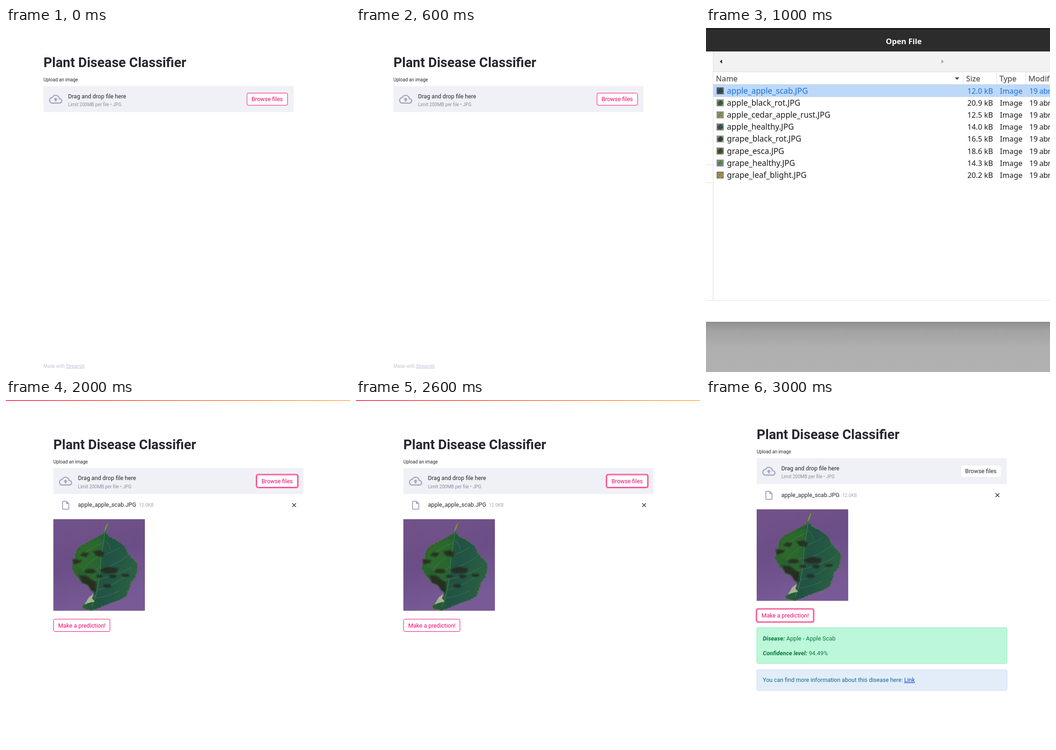
Animation of 748 by 748 pixels, one loop 4000 ms. Source, as an HTML page:

```html
<!DOCTYPE html>
<html lang="en">
<head>
<meta charset="utf-8">
<title>Plant Disease Classifier</title>
<style>
  html, body { margin: 0; width: 100%; height: 100%; overflow: hidden; background: #fff; }
  svg { display: block; width: 100%; height: 100%; }
  text { font: 12.6px Roboto, sans-serif; fill: #262730; }
  text.title { font-size: 29.1px; font-weight: 700; }
  text.small { font-size: 10px; }
  text.muted { fill: #8d8c9c; }
  text.pale { fill: #a3a8b8; }
  text.foot { fill: #bfc5d3; }
  text.pink { fill: #f0066f; }
  .under { text-decoration: underline; }
  .button { fill: #fff; stroke: #f0066f; }
  .ring { fill: none; stroke: #fa6a9f; stroke-width: 2.4; }
  .icon { fill: #a3a3bb; }
  text.ok { font-size: 12.85px; fill: #0a7a41; }
  .ok tspan { font-weight: 700; font-style: italic; }
  text.info { font-size: 12.55px; fill: #13698a; }
  .info tspan { fill: #0a46c4; }
  #dialog text { font: 17.4px "Noto Sans", sans-serif; fill: #1c1c1c; }
  #dialog .head { font-size: 16.8px; fill: #5c5c5c; stroke: #5c5c5c; stroke-width: .35; }
  #dialog .bar { font-size: 16.7px; font-weight: 700; fill: #fff; }
  #dialog .cell { font-size: 16.3px; }
  #dialog .date { font-size: 16.3px; letter-spacing: -.4px; }
  #dialog .picked text { fill: #1a73de; }
</style>
</head>
<body>
<svg viewBox="0 0 748 748">
  <defs>
    <linearGradient id="loading"><stop stop-color="#ff4268"/><stop offset=".5" stop-color="#ff8560"/><stop offset="1" stop-color="#ffc266"/></linearGradient>
    <linearGradient id="shade" x2="0" y2="1"><stop stop-color="#929292"/><stop offset=".18" stop-color="#a3a3a3"/><stop offset=".5" stop-color="#afafaf"/><stop offset="1" stop-color="#b1b1b1"/></linearGradient>
    <linearGradient id="purple" x2=".3" y2="1"><stop stop-color="#73528a"/><stop offset=".5" stop-color="#6b4e87"/><stop offset="1" stop-color="#785a96"/></linearGradient>
    <linearGradient id="green" x2="1" y2=".25"><stop stop-color="#33652c"/><stop offset=".42" stop-color="#265e31"/><stop offset=".6" stop-color="#205145"/><stop offset="1" stop-color="#2a5f42"/></linearGradient>
    <filter id="soft"><feGaussianBlur stdDeviation="1.6"/></filter>
    <filter id="jagged"><feTurbulence baseFrequency=".22" numOctaves="2" seed="4"/><feDisplacementMap in="SourceGraphic" scale="5" xChannelSelector="R" yChannelSelector="G"/></filter>

    <g id="uploader">
      <text class="title" x="81.5" y="85">Plant Disease Classifier</text>
      <text class="small" x="81.5" y="116">Upload an image</text>
      <rect x="81.5" y="126.3" width="544" height="56.7" rx="3" fill="#f0f1f6"/>
      <path class="icon" transform="translate(93.6 140.4) scale(1.2)" d="M19.35 10.04A7.49 7.49 0 0 0 12 4C9.11 4 6.6 5.64 5.35 8.04A6 6 0 0 0 0 14c0 3.31 2.69 6 6 6h13c2.76 0 5-2.24 5-5 0-2.64-2.05-4.78-4.65-4.96zM19 18H6c-2.21 0-4-1.79-4-4 0-2.05 1.53-3.76 3.56-3.97l1.07-.11.5-.95A5.47 5.47 0 0 1 12 6c2.62 0 4.88 1.86 5.39 4.43l.3 1.5 1.53.11A2.98 2.98 0 0 1 22 15c0 1.65-1.35 3-3 3zM8 13h2.55v3h2.9v-3H16l-4-4z"/>
      <text x="135" y="152.5">Drag and drop file here</text>
      <text class="small muted" x="135" y="170">Limit 200MB per file • JPG</text>
    </g>

    <g id="browse">
      <rect class="button" x="524" y="141.5" width="88.3" height="26.5" rx="3"/>
      <text class="pink" x="568" y="159" text-anchor="middle">Browse files</text>
    </g>

    <g id="leaf">
      <rect width="199" height="199" fill="url(#purple)"/>
      <g filter="url(#jagged)">
        <path d="M120 6C112 13 115 21 108 29C98 37 88 40 79 45C66 52 54 58 49 65L43 88 38 105 48 122 62 137 77 146C84 154 89 161 87 167L75 180 61 187 62 193 82 197 102 190 122 182 143 174C154 170 158 166 160 160L165 148 169 133C175 130 179 126 179 118L183 102C180 94 177 89 172 85L161 74C158 64 155 58 149 53L134 43C126 38 119 36 114 30C111 22 118 14 120 6Z" fill="url(#green)" stroke="#537347" stroke-width="1"/>
      </g>
      <path d="M107 42C83 45 62 54 53 72L52 104C70 111 86 126 91 150C99 124 105 80 107 42Z" fill="#347b27" opacity=".32" filter="url(#soft)"/>
      <g fill="none" stroke="#62926a" stroke-width=".9" opacity=".55">
        <path d="M118 8C111 19 111 27 111 35C107 65 102 82 102 107C98 140 95 166 83 190" stroke-width="1.4"/>
        <path d="M108 52Q89 57 62 79M104 79Q83 85 64 111M102 104Q82 113 69 127M99 132Q91 131 82 137M110 45Q123 54 124 67M105 79Q130 71 145 61M102 108Q135 101 164 78M100 130Q137 123 170 104M96 154Q125 147 153 127M92 171Q118 169 143 156"/>
      </g>
      <g fill="#25251a" opacity=".82" filter="url(#soft)">
        <path d="M86 70L102 67 112 75 107 82 94 80Z"/>
        <path d="M57 79L65 72 78 73 72 82Z"/>
        <path d="M41 87L62 89 57 95 44 98Z"/>
        <path d="M103 108L118 103 141 107 138 116 116 118 103 114Z"/>
        <path d="M56 122L72 123 83 132 93 136 92 158 82 155 75 142 62 138Z"/>
        <ellipse cx="80" cy="113" rx="12" ry="5"/>
        <ellipse cx="117" cy="145" rx="9" ry="4"/>
        <ellipse cx="129" cy="124" rx="8" ry="4"/>
        <ellipse cx="157" cy="122" rx="9" ry="3"/>
        <ellipse cx="100" cy="124" rx="7" ry="3"/>
      </g>
      <path d="M87 162L84 172 90 179 77 182 68 185 77 170Z" fill="#a5b492"/>
      <path d="M111 24Q113 14 120 7Q117 17 113 26" fill="#7d8f48"/>
    </g>

    <g id="upload">
      <path class="icon" transform="translate(96.7 195.8) scale(.96)" d="M14 2H6c-1.1 0-2 .9-2 2v16c0 1.1.9 2 2 2h12c1.1 0 2-.9 2-2V8l-6-6zM6 20V4h7v5h5v11H6z"/>
      <text x="135" y="210.5">apple_apple_scab.JPG</text>
      <text class="small pale" x="267.5" y="210.5">12.0KB</text>
      <path d="M601 203l8 8m0-8l-8 8" stroke="#262730" stroke-width="1.4"/>
      <use href="#leaf" x="81.5" y="237.7"/>
      <rect class="button" x="82" y="455" width="122.5" height="27" rx="3"/>
      <text class="pink" x="92" y="473">Make a prediction!</text>
    </g>
  </defs>

  <g class="scene">
    <use href="#uploader"/><use href="#browse"/>
    <text class="small foot" x="81.5" y="738.5">Made with <tspan class="under">Streamlit</tspan></text>
  </g>

  <g class="scene" id="dialog">
    <rect width="748" height="748" fill="#fff"/>
    <rect width="748" height="51" fill="#2c2c2c"/>
    <rect width="748" height="5" fill="#222"/>
    <path d="M0 5.5H748" stroke="#393939"/>
    <text class="bar" x="430" y="34.5" text-anchor="middle">Open File</text>
    <rect x="15" y="51" width="733" height="45" fill="#f2f2f2"/>
    <path d="M35 68.5v9l-5-4.5z" fill="#333"/>
    <path d="M512 68.5v9l5-4.5z" fill="#a5a5a5"/>
    <path d="M15.5 51V592M0 297.5H15M0 336.5H15M15 95.5H748M15 122.5H748M559.5 96V123M631.5 96V123M695.5 96V123M0 592.5H748" fill="none" stroke="#dedede"/>
    <path d="M541 107.5h10l-5 5z" fill="#444"/>
    <text class="head" x="21.5" y="116">Name</text>
    <text class="head" x="565.5" y="116">Size</text>
    <text class="head" x="638" y="116">Type</text>
    <text class="head" x="701" y="116">Modified</text>
    <rect x="16" y="123" width="732" height="27" fill="#bdd8f8"/>
    <g id="rows"></g>
    <rect y="640" width="748" height="108" fill="url(#shade)"/>
    <path d="M0 639.5H748" stroke="#777"/>
  </g>

  <g class="scene">
    <rect width="748" height="2" fill="url(#loading)"/>
    <g transform="translate(21.5 21.5)">
      <use href="#uploader"/><use href="#browse"/><use href="#upload"/>
      <rect class="ring" x="522.6" y="140.1" width="91.1" height="29.3" rx="4"/>
    </g>
  </g>

  <g class="scene">
    <g transform="translate(28.7 0)">
      <use href="#uploader"/><use href="#upload"/>
      <rect x="525.3" y="141.5" width="88" height="26.5" rx="3" fill="#fff" stroke="#e9eaf0"/>
      <text x="569" y="159" text-anchor="middle">Browse files</text>
      <rect class="ring" x="80.6" y="453.6" width="125.3" height="29.8" rx="4"/>
    </g>
    <rect x="110.5" y="495" width="544" height="78" rx="3" fill="#bdf7d9" stroke="#8eeabd"/>
    <text class="ok" x="123.5" y="522.5"><tspan>Disease:</tspan> Apple - Apple Scab</text>
    <text class="ok" x="123.5" y="554.5"><tspan>Confidence level:</tspan> 94.49%</text>
    <rect x="110.5" y="586.5" width="544" height="45" rx="3" fill="#e3edfa" stroke="#cbdcf3"/>
    <text class="info" x="123.5" y="613">You can find more information about this disease here: <tspan class="under">Link</tspan></text>
  </g>
</svg>
<script>
  // name, size, thumbnail background, thumbnail leaf
  const files = [
    ["apple_apple_scab", "12.0", "#5f5473", "#28533b"],
    ["apple_black_rot", "20.9", "#8b8791", "#2d6a2d"],
    ["apple_cedar_apple_rust", "12.5", "#8d8585", "#8b9a55"],
    ["apple_healthy", "14.0", "#7d7684", "#2f5548"],
    ["grape_black_rot", "16.5", "#91908f", "#2b4a2a"],
    ["grape_esca", "18.6", "#7c7772", "#35522c"],
    ["grape_healthy", "14.3", "#8a8792", "#579054"],
    ["grape_leaf_blight", "20.2", "#8c7775", "#a99a43"],
  ];
  document.getElementById("rows").innerHTML = files.map(([name, size, back, leaf], i) => {
    const y = 136.6 + i * 26.17, base = y + 6.2;
    return `<g class="${i ? "" : "picked"}">
      <rect x="23" y="${y - 7.5}" width="15.5" height="15" fill="${back}"/>
      <path transform="translate(31 ${y})" d="M0-6L5-3 6 2 1 6-5 5-6-1Z" fill="${leaf}"/>
      <path transform="translate(31 ${y})" d="M2-5L-2 1-4 5M-3-1h3M1 1l3 1" fill="none" stroke="#263b22" opacity=".6"/>
      <text x="45.5" y="${base}">${name}.JPG</text>
      <text class="cell" x="624" y="${base}" text-anchor="end">${size} kB</text>
      <text class="cell" x="639" y="${base}">Image</text>
      <text class="date" x="703" y="${base}">19 abr</text></g>`;
  }).join("");

  const scenes = document.querySelectorAll(".scene");
  function draw() {
    const step = Math.floor(performance.now() / 1000) % scenes.length;
    scenes.forEach((scene, i) => scene.style.display = i === step ? "" : "none");
    requestAnimationFrame(draw);
  }
  draw();
</script>
</body>
</html>
```
